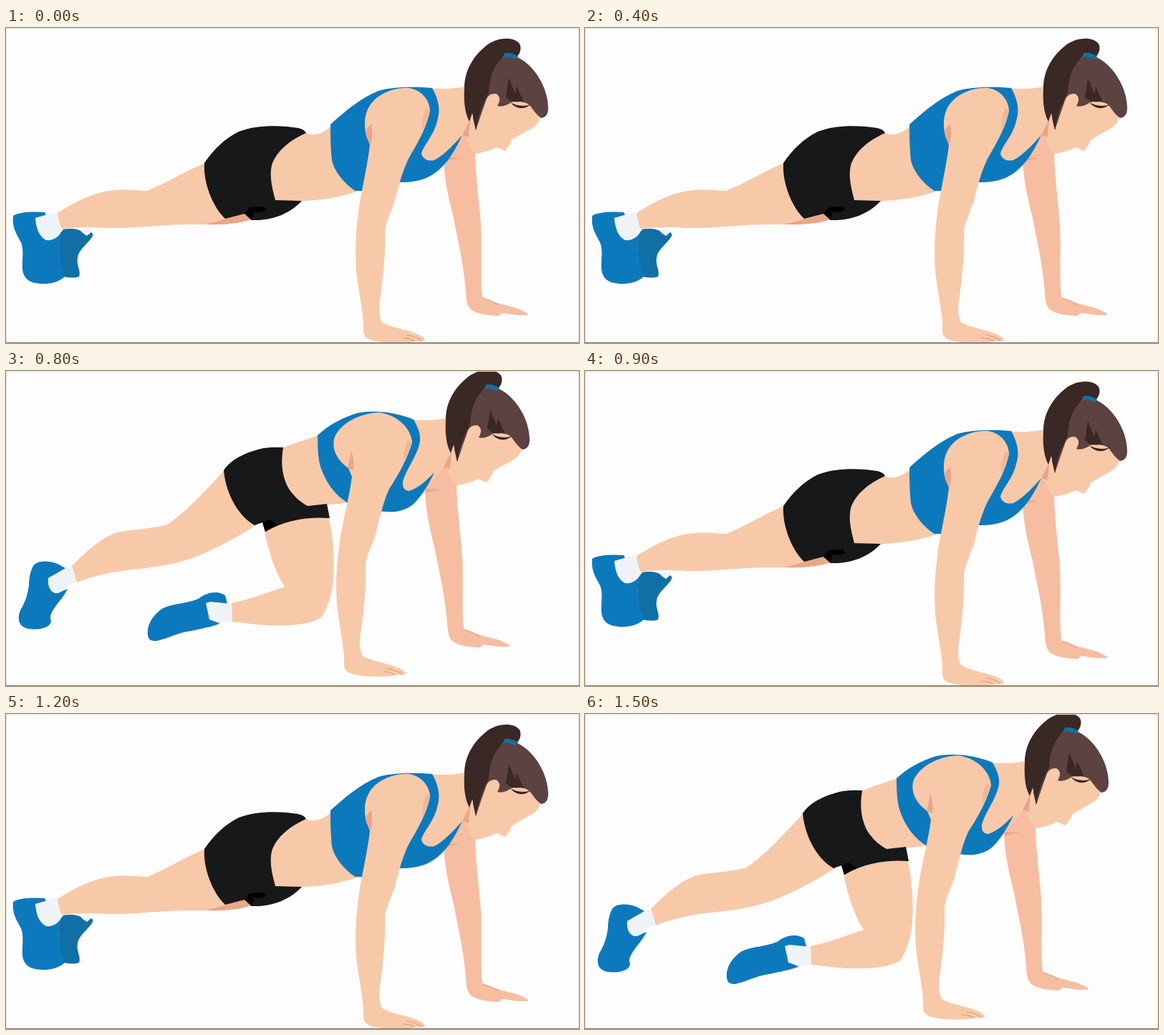
These frames come from a looping animation (800 by 441 pixels, 1.6 s). An HTML page:

```html
<!DOCTYPE html>
<html lang="en">
<head>
<meta charset="utf-8">
<title>Plank knee drive</title>
<style>
html, body { margin: 0; width: 100%; height: 100%; overflow: hidden; background: #fdfdfd; }
svg { display: block; width: 100vw; height: 100vh; }
.skin { fill: #f8c9a8; }
.far { fill: #f6bda1; }
.shade { fill: #e8a788; }
.soft { fill: #f0b797; }
.blue { fill: #0d79bd; }
.deep { fill: #1070a5; }
.cloth { fill: #17181a; }
.sock { fill: #eff3f7; }
.hair { fill: #5c4240; }
.dark { fill: #3a2824; }
.line { fill: none; stroke: #dc9a7b; stroke-width: 1.2; stroke-linecap: round; }

/* two held poses, swapped by hard cuts */
.plank, .drive, .head, .hand { animation: 1.6s step-end infinite; }
.plank { animation-name: plank; }
.drive { animation-name: drive; visibility: hidden; }
.head { --shift: translate(-26px, -16px); animation-name: shift; }
.hand { --shift: translate(-27px, -13px); animation-name: shift; }
@keyframes plank { 0%, 56.25% { visibility: visible; } 31.25%, 81.25%, 100% { visibility: hidden; } }
@keyframes drive { 0%, 56.25% { visibility: hidden; } 31.25%, 81.25%, 100% { visibility: visible; } }
@keyframes shift { 0%, 56.25% { transform: none; } 31.25%, 81.25%, 100% { transform: var(--shift); } }
</style>
</head>
<body>
<svg viewBox="0 0 800 441" preserveAspectRatio="none">
  <rect width="800" height="441" fill="#fdfdfd"/>

  <!-- far arm, neck and head -->
  <g class="head">
    <path class="far" d="M637 150L611 182C612 215 619 242 625 266C629 290 636 315 640 350C643 370 641 385 648 393C655 400 675 403 688 403L692 399C700 399 708 402 716 402L728 402Q732 400 715 393C700 388 672 383 665 376C662 350 665 310 663 275C661 245 655 205 655 172L650 148Z"/>
    <path class="shade" d="M611 181L634 182L613 186Z"/>
    <path class="line" d="M668 379Q677 381 686 387"/>
    <path class="skin" d="M588 84C610 86 630 85 644 81L664 140L636 151L604 192L572 182Z"/>
    <path class="skin" d="M645 120L672 92C695 84 725 95 746 124C745 134 736 140 726 145C716 150 710 154 706 157L704 162L697 172L685 167C675 172 664 175 655 176C648 170 645 160 640 150Z"/>
    <path class="shade" d="M648 128L637 150L646 153Z"/>
    <path class="hair" d="M686 44C698 37 710 38 718 43C738 54 757 84 757 112Q757 125 747 126C740 121 736 114 731 108Q718 100 705 104C700 108 692 111 686 109Q693 97 684 92Q675 91 671 99L663 122L656 143L652 126L664 80Z"/>
    <path class="dark" d="M640 84C640 60 652 40 669 26C684 13 708 11 717 22C721 30 716 40 710 42C700 36 694 38 690 45C680 56 675 70 674 90L664 112C660 122 658 132 656 143L651 119L647 131C640 118 639 100 640 84Z"/>
    <path class="dark" d="M702 70L698 97L706 103L723 104L713 82L711 92Z"/>
    <path class="skin" d="M708 106Q718 100 730 107Q720 112 708 106Z"/>
    <path class="dark" d="M704 104Q718 112 733 107Q717 119 704 104Z"/>
    <path class="deep" d="M696 35Q707 34 715 40L711 44Q703 39 694 41Z"/>
  </g>

  <g class="plank">
    <path class="shade" d="M262 274C300 277 325 274 343 268L334 258L300 264Z"/>
    <path class="sock" d="M104 283L117 281L121 287L113 292Z"/>
    <path class="deep" d="M78 282C90 280 104 281 107 287L113 291L119 286Q123 288 120 293C113 303 100 312 100 322C98 332 105 340 102 348Q95 351 80 348C74 330 70 300 78 282Z"/>
    <path class="blue" d="M10 263C18 257 40 257 54 258L56 262L41 266C44 280 48 292 56 297C64 298 72 294 77 286C72 300 72 325 82 348C74 356 60 359 48 358C32 357 24 350 23 338C22 325 25 315 22 303C19 293 8 284 10 263Z"/>
    <path class="sock" d="M41 266L72 257Q71 270 80 282C74 290 66 297 56 297C46 292 42 280 41 266Z"/>
    <path class="skin" d="M72 259C100 241 125 229 152 227C170 225 185 228 197 228C225 217 250 200 280 188L310 266C295 271 280 276 262 275C225 274 180 281 140 280C115 278 95 279 78 281Q73 272 72 259Z"/>
    <path class="skin" d="M416 146C428 152 440 150 456 136L498 226C460 240 430 243 374 243C364 215 366 185 380 166Z"/>
    <path class="cloth" d="M277 189C290 170 305 155 325 145C350 135 385 136 408 140Q417 142 419 147C395 158 378 172 371 192C367 210 373 228 376 241L413 242C400 256 378 270 343 269L333 260L306 267C288 250 275 215 277 189Z"/>
    <path d="M333 260L340 251L360 250L364 255Q355 259 346 257L343 269Z"/>
    <path class="blue" d="M453 135C475 115 495 98 520 88C540 82 570 82 595 84C604 100 607 115 602 130C598 150 582 165 580 176C582 184 590 187 598 185C612 178 628 160 637 150C630 165 620 185 605 198C592 210 575 217 548 216L498 228L488 228C472 218 458 200 455 185C453 165 453 150 453 135Z"/>
    <path class="skin" d="M503 150C498 130 502 112 515 100C530 87 550 83 563 84C580 87 591 100 592 115C588 140 572 165 561 185C552 205 547 225 542 246L493 250C498 220 505 190 508 164Z"/>
    <path class="shade" d="M510 134Q500 143 503 152L509 164Q513 150 510 134Z"/>
    <path class="soft" d="M587 112Q580 126 581 143Q589 130 592 116Z"/>
  </g>

  <g class="drive">
    <path class="blue" d="M38 273C43 265 60 265 72 270L83 276L59 290C58 302 62 311 72 311L86 305C80 318 68 328 63 340Q61 344 63 350C62 360 45 363 32 361C18 359 15 348 20 335C26 325 30 315 32 300C32 290 34 280 38 273Z"/>
    <path class="sock" d="M59 290L91 273L99 295L84 301Q78 312 68 311Q58 304 59 290Z"/>
    <path class="skin" d="M92 273C110 255 130 235 155 226C180 221 205 221 225 215C255 195 280 165 305 139L350 215C320 235 290 250 260 262C220 275 190 276 160 280C135 284 115 289 99 296Z"/>
    <path class="blue" d="M198 370C196 355 205 343 216 334C230 325 255 326 270 318C280 310 295 307 306 314L309 326L284 324L283 345L299 353C290 358 275 360 258 364C240 366 228 374 210 378Q199 379 198 370Z"/>
    <path class="sock" d="M279 325L285 323L315 326L316 351L298 353L284 348Z"/>
    <path class="skin" d="M361 225C385 208 420 204 450 205C456 225 459 260 457 290C456 310 450 330 440 345C425 356 390 357 365 356C345 355 330 352 316 351L315 325C340 320 365 310 389 302C375 280 366 250 361 225Z"/>
    <path class="skin" d="M385 108C405 100 420 96 438 89L478 184C460 187 440 188 419 190C396 175 378 145 385 108Z"/>
    <path class="cloth" d="M304 139C315 122 340 112 360 108Q375 106 387 107C383 130 386 150 395 165C403 177 412 184 421 189L448 186L452 206C425 204 393 207 362 225L358 212L347 216C320 200 306 165 304 139Z"/>
    <path d="M358 212L368 208L379 215L362 225Z"/>
    <path class="blue" d="M435 90C450 76 470 65 490 59C515 54 545 58 569 68C577 82 580 92 577 103C573 120 558 139 554 155Q553 168 563 168C578 163 590 150 598 142C590 160 578 178 568 187C555 197 540 199 521 196L478 185C460 175 445 155 438 130C435 115 435 100 435 90Z"/>
    <path class="skin" d="M478 136C462 125 455 110 458 95C465 75 490 60 520 58C545 60 566 80 567 100C560 125 545 150 535 165C528 180 521 207 515 233L466 237C471 207 479 178 483 148Z"/>
    <path class="shade" d="M482 112L477 136L485 139Q487 124 482 112Z"/>
    <path class="soft" d="M561 96Q554 110 555 127Q563 114 566 101Z"/>
  </g>

  <!-- near forearm -->
  <g class="hand">
    <path class="skin" d="M495 240L543 240C538 260 530 270 529 285C530 320 526 350 523 375C520 390 520 402 525 412C535 418 552 421 565 425Q583 431 585 436Q584 440 574 438C560 442 530 442 510 437Q499 434 499 424C500 400 492 370 489 340C487 310 488 280 495 240Z"/>
    <path class="line" d="M560 430Q570 431 579 437M554 434Q562 434 570 438"/>
  </g>

  <path d="M0 .5H800M.5 0V441M799.5 0V441" stroke="#dedede"/>
  <path d="M0 440.5H800" stroke="#777"/>
</svg>
</body>
</html>
```
